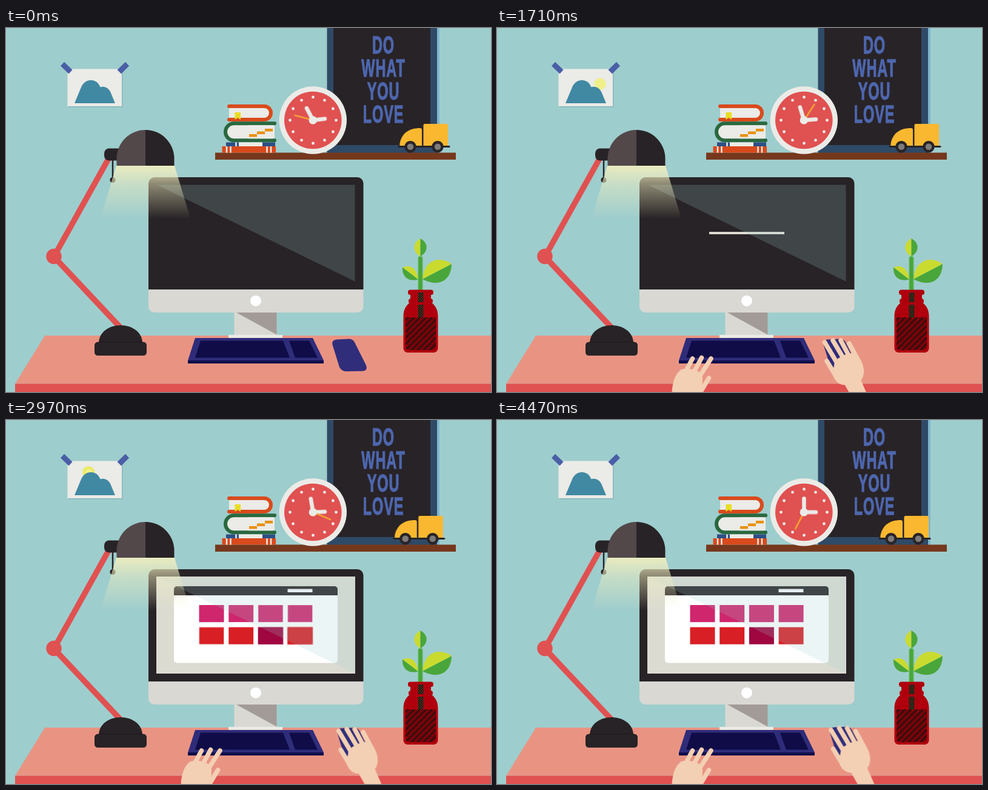
An HTML page for the animation above (4500 ms loop, 800x600 px).

```html
<!DOCTYPE html>
<html lang="en">
<head>
<meta charset="utf-8">
<title>Desk</title>
<style>
html, body { margin: 0; width: 100%; height: 100%; overflow: hidden; background: #9ecdcd; }
svg { display: block; width: 800px; height: 600px; }

.loop, .loop * { animation: 4500ms linear infinite both; }
.sign {
  font: bold 41px "Liberation Sans", Arial, sans-serif;
  text-anchor: middle; letter-spacing: 1.5px;
  fill: #4d66ae; stroke: #4d66ae; stroke-width: 1.3;
}
.dark { fill: #282326; }
.paper { fill: #ebebe7; }
.coral { fill: #e05151; }
.skin { fill: #f3cfb3; stroke: #f3cfb3; stroke-width: 7.5; stroke-linecap: round; stroke-linejoin: round; }
.skin .palm { stroke-width: 1; }

.hand-s, .hand-m, .hand-h { transform-origin: 506.5px 152px; stroke-linecap: round; }
.loop .hand-s { animation-name: seconds; }
.loop .hand-m { animation-name: minutes; }
.loop .hand-h { animation-name: hours; }
@keyframes seconds { from { transform: rotate(285deg); } to { transform: rotate(569.6deg); } }
@keyframes minutes { from { transform: rotate(-28deg); } to { transform: rotate(0deg); } }
@keyframes hours { from { transform: rotate(83deg); } to { transform: rotate(90deg); } }

.loop .truck { animation-name: drive; animation-timing-function: ease-in-out; }
@keyframes drive {
  0%, 37.78%, 76.22% { transform: translateX(0); }
  17.78%, 55.56%, 94%, 100% { transform: translateX(-17px); }
}

.loop .sun { transform-origin: 151px 101px; animation-name: arc; }
.loop .disc { animation-name: glow; }
.loop .ring { animation-name: ring; }
@keyframes arc {
  0%, 1.47% { transform: rotate(-100deg); }
  46.67% { transform: rotate(104deg); }
  46.68%, 54.4% { transform: rotate(-97deg); }
  97.8%, 100% { transform: rotate(97deg); }
}
@keyframes glow {
  0%, 2.6%, 45.5%, 55.6%, 97%, 100% { opacity: 0; }
  9.2%, 38%, 62%, 90% { opacity: 1; }
}
@keyframes ring {
  0%, 9.2%, 38%, 62%, 90%, 100% { opacity: 0; }
  17.5%, 29.9%, 70%, 82% { opacity: 1; }
}

.loop .rise { animation-name: rise; }
@keyframes rise {
  0%, 4.4% { transform: translateY(95px); animation-timing-function: ease-out; }
  15.2%, 100% { transform: none; }
}
.loop .nudge { animation-name: nudge; }
@keyframes nudge {
  0%, 60% { transform: none; animation-timing-function: ease-in-out; }
  69%, 100% { transform: translate(10.5px, -7px); }
}

.loop .lit { transform-origin: 412px 338px; animation-name: power; }
@keyframes power {
  0%, 36% { transform: scale(0, .022); }
  38% { transform: scale(.372, .022); }
  40.5% { transform: scale(1, .022); animation-timing-function: ease-in-out; }
  43.5%, 100% { transform: none; }
}
.loop .window { animation-name: slide; }
@keyframes slide {
  0%, 43.78% { transform: translateY(144px); animation-timing-function: cubic-bezier(.37, 0, .63, 1); }
  58.44%, 100% { transform: none; }
}
.loop .tile {
  transform-box: fill-box; transform-origin: center;
  animation-name: pop; animation-timing-function: ease-in-out;
  animation-delay: calc(var(--i) * 40ms);
}
@keyframes pop {
  0%, 48.89% { transform: scale(0); animation-timing-function: linear; }
  50.44% { transform: scale(1); animation-timing-function: ease-out; }
  52.22% { transform: scale(1.095); }
  55.78% { transform: scale(.953); }
  59.33% { transform: scale(1.026); }
  62.89% { transform: scale(.986); }
  66.44%, 100% { transform: none; }
}
</style>
</head>
<body>
<svg viewBox="0 0 800 600" xmlns="http://www.w3.org/2000/svg">
  <defs>
    <linearGradient id="beam" gradientUnits="userSpaceOnUse" x1="0" y1="227" x2="0" y2="315">
      <stop offset="0" stop-color="#f0edbf" stop-opacity=".92"/>
      <stop offset=".35" stop-color="#f0edbf" stop-opacity=".5"/>
      <stop offset="1" stop-color="#f0edbf" stop-opacity="0"/>
    </linearGradient>
    <pattern id="stripes" width="7" height="7" patternUnits="userSpaceOnUse" patternTransform="rotate(45)">
      <rect width="7" height="7" fill="#7c0008"/>
      <rect width="2.6" height="7" fill="#2b100f"/>
    </pattern>
    <pattern id="specks" width="4" height="4" patternUnits="userSpaceOnUse">
      <rect width="4" height="4" fill="#1e1512"/>
      <path d="M0 0h1.5v1.5H0zM2 2h1.5v1.5H2z" fill="#62502a"/>
    </pattern>
    <clipPath id="screen"><rect x="248.5" y="258.5" width="327" height="159.5"/></clipPath>
  </defs>

  <rect width="800" height="600" fill="#9ecdcd"/>

  <!-- picture on the wall -->
  <rect x="103" y="69" width="89.5" height="61.5" fill="#87b5bb"/>
  <rect class="paper" x="101.5" y="67.5" width="89.5" height="61.5"/>
  <g class="loop"><g class="sun">
    <circle class="disc" cx="151" cy="80" r="9.7" fill="#f0f08a"/>
    <circle class="ring" cx="151" cy="80" r="8" fill="none" stroke="#e7e52d" stroke-width="3.8"/>
  </g></g>
  <path d="M113 124L123 100C127 89 134 86 140 86C148 86 153 91 155.500 97.500C163 95 170 100 172.500 106L180 124z" fill="#4189a3"/>
  <g fill="#4a5fa6">
    <path d="M96 56l13.500 13l-6 6.500l-13.500-13z"/>
    <path d="M197 56l6 6.500l-13 13l-6.500-6.500z"/>
  </g>

  <!-- sign -->
  <rect x="711" width="4" height="205.500" fill="#7fb6cd"/>
  <rect x="529.500" width="181.500" height="206" fill="#2f4a67"/>
  <rect class="dark" x="540" width="160" height="193"/>
  <g class="sign" transform="translate(622.500 0) scale(.575 1)">
    <text y="42.500">DO</text>
    <text y="80.500">WHAT</text>
    <text y="118">YOU</text>
    <text y="156.500">LOVE</text>
  </g>

  <rect x="345" y="205.500" width="397" height="11.500" fill="#76381d"/>

  <!-- books -->
  <rect class="paper" x="370" y="130" width="60" height="21"/>
  <path d="M368 129H426a11 11 0 0 1 0 22H368" class="paper" stroke="#d94a1c" stroke-width="6" stroke-linecap="round"/>
  <path d="M377.500 139h9.500v12l-4.700-3l-4.800 3z" fill="#e8de22"/>
  <path d="M443 157.300H376a14 14 0 0 0 0 28H443" class="paper" stroke="#2a683f" stroke-width="6" stroke-linecap="round"/>
  <rect class="paper" x="400" y="160.300" width="40" height="22"/>
  <path d="M401 175h13v4.500h-13zM414 170.500h13v4.500h-13zM427 166h13v4.500h-13z" fill="#e8910f"/>
  <path class="paper" d="M383 188.500h40v7h-40z"/>
  <path d="M363 188.500h21v7h-21zM423 188.500h21v7h-21z" fill="#2d4f86"/>
  <rect x="356.500" y="195" width="88.500" height="10.500" fill="#d94a1c"/>
  <path d="M364 195v10.500M370.500 195v10.500M430.500 195v10.500M437 195v10.500M379.500 188.500v6.500" stroke="#ebebe7" stroke-width="2.500"/>

  <!-- clock -->
  <circle class="paper" cx="506.300" cy="152" r="55.700"/>
  <circle class="coral" cx="506.300" cy="152" r="47.300"/>
  <circle cx="506.500" cy="152" r="38" fill="none" stroke="#ebebe7" stroke-width="4.800" stroke-linecap="round" pathLength="12" stroke-dasharray="0 1"/>
  <g class="loop">
    <path class="hand-m" d="M506.500 152V129.500" stroke="#ebebe7" stroke-width="6.500"/>
    <path class="hand-h" d="M506.500 152V132.500" stroke="#ebebe7" stroke-width="6.500"/>
    <path class="hand-s" d="M506.500 152V121" stroke="#f6ae2d" stroke-width="2.300"/>
  </g>
  <circle class="paper" cx="506.300" cy="152" r="6.700"/>

  <!-- truck -->
  <g class="loop"><g class="truck">
    <rect x="688.500" y="158" width="40.500" height="37" rx="2.500" fill="#f9b82f"/>
    <path d="M649.500 195V190C653 173 665 165 683 165Q686 165 686 168V195z" fill="#f9b82f"/>
    <path d="M648 195.500H731" stroke="#282326" stroke-width="3" stroke-linecap="round"/>
    <g class="dark"><circle cx="667" cy="195.700" r="9.700"/><circle cx="712" cy="195.700" r="9.700"/></g>
    <g fill="#7d7c7a"><circle cx="667" cy="195.700" r="5.300"/><circle cx="712" cy="195.700" r="5.300"/></g>
  </g></g>

  <!-- desk -->
  <path d="M64 507H800V586.500H15z" fill="#e99483"/>
  <rect class="coral" x="15" y="586.500" width="785" height="13.500"/>

  <!-- monitor -->
  <rect x="376.500" y="468" width="70" height="38" fill="#d9d8d3"/>
  <path d="M379 468.500H446.500V505.500z" fill="#a29b97"/>
  <rect class="paper" x="367" y="505.800" width="89" height="5"/>
  <rect x="235" y="400" width="354.500" height="69" rx="10" fill="#d9d8d3"/>
  <path class="dark" d="M235 431V256a10 10 0 0 1 10-10H579.500a10 10 0 0 1 10 10V431z"/>
  <circle cx="412" cy="449.700" r="9" fill="#fff"/>
  <g clip-path="url(#screen)">
    <g class="loop">
      <rect class="lit" x="248" y="258" width="328" height="160" fill="#dbdbd2"/>
      <g class="window">
        <rect x="277" y="274" width="270" height="126.500" rx="5" fill="#fff"/>
        <path class="dark" d="M277 289V279a5 5 0 0 1 5-5H542a5 5 0 0 1 5 5V289z"/>
        <rect x="464.500" y="278.500" width="41" height="5.500" fill="#f5f5f8"/>
        <g id="tiles"></g>
      </g>
    </g>
    <path d="M248 258H576V418z" fill="#9ecdcd" opacity=".2"/>
  </g>

  <!-- lamp -->
  <path d="M171 212L79 377L190 495" fill="none" stroke="#e05151" stroke-width="9.500"/>
  <circle class="coral" cx="79" cy="376.500" r="12.700"/>
  <rect class="dark" x="162" y="198.500" width="34" height="20" rx="8"/>
  <path d="M176 216V248" stroke="#282326" stroke-width="2.500"/>
  <circle class="dark" cx="176" cy="250.500" r="4.600"/>
  <path d="M182 227H278L318 360H142z" fill="url(#beam)"/>
  <path d="M182.500 227V215.500A47.500 47.500 0 0 1 230.500 168V227z" fill="#524849"/>
  <path class="dark" d="M230 168A47.500 47.500 0 0 1 277.500 215.500V227H230z"/>
  <path class="dark" d="M153 518C154 501 170 490 189 490S224 501 225 518z"/>
  <rect class="dark" x="146" y="517.500" width="86" height="22.500" rx="5.500"/>
  <path d="M153 517.500H225" stroke="#1b1719" stroke-width="1"/>

  <!-- plant -->
  <path d="M683.500 347C670 354 670 369 683.500 376.500z" fill="#cadb30"/>
  <path d="M683.500 347C697 354 697 369 683.500 376.500z" fill="#49a63a"/>
  <path d="M654 394.500C667 389 678 396 680 414.500z" fill="#cadb30"/>
  <path d="M654 394.500C653 410 664 419 680 414.500z" fill="#49a63a"/>
  <path d="M687 414C689 386 711 373 735 389z" fill="#cadb30"/>
  <path d="M687 414C711 427 734 419 735 389z" fill="#49a63a"/>
  <path d="M683.500 380V434" stroke="#5cb552" stroke-width="8" stroke-linecap="round"/>
  <path d="M683.500 380V434" stroke="#49a63a" stroke-width="5" stroke-linecap="round"/>
  <g fill="#b0000e">
    <rect x="663" y="431.500" width="42" height="8.500" rx="4"/>
    <rect x="667" y="438" width="34" height="20"/>
    <rect x="664" y="446" width="40" height="8.500" rx="4"/>
    <path d="M667 452C660 457 655.500 464 655.500 475V528a7 7 0 0 0 7 7H705.500a7 7 0 0 0 7-7V475C712.500 464 708 457 701 452z"/>
  </g>
  <path d="M679.500 436h9v16h-9zM679.500 456h9v21h-9z" fill="url(#specks)"/>
  <path d="M659 477H709V526a5 5 0 0 1-5 5H664a5 5 0 0 1-5-5z" fill="url(#stripes)"/>

  <!-- keyboard -->
  <path d="M312 511H506L524 548H300z" fill="#2f2c7a"/>
  <rect x="300" y="548" width="224" height="5" fill="#100d4a"/>
  <path d="M321 515.500H457L468 543.500H312zM467 515.500H500L514 543.500H477z" fill="#0f0c47"/>

  <!-- mouse and hands -->
  <g class="loop">
    <g class="nudge">
      <path d="M545 513.500L566 512.500Q572 512.500 575 518L594 556Q597 564.500 589 565.500L560 566Q553 565 550 559L538.500 522Q537 514.500 545 513.500z" fill="#302d7b"/>
      <g class="rise skin">
        <path d="M540.500 518L562 554M554 515L573 547M567 515L583 545M581 520L596 548M544 549L561 577" fill="none"/>
        <path class="palm" d="M558 549C568 540 580 535 592 537C600 546 605 556 604.500 568C604 574 602 578 600 581L617 620H592L574 588C563 588 556 580 554 570z"/>
      </g>
    </g>
    <g class="rise skin">
      <path d="M322.500 545L308 572M337.500 543.500L321 574M353 545L333 576M349.500 577L335 601" fill="none"/>
      <path class="palm" d="M303 564C312 560 326 562 338 570C339 582 338 590 337 600L334 630H284L289 600C290 584 294 571 303 564z"/>
    </g>
  </g>
</svg>
<script>
const pink = '#d0266d', red = '#d81f25', wine = '#a00640';
const colors = [pink, pink, pink, pink, red, red, wine, red];
document.getElementById('tiles').innerHTML = colors.map((fill, i) => {
  const x = 318.5 + (i % 4) * 48.7, y = i < 4 ? 305 : 341.5;
  return `<rect class="tile" style="--i:${i}" x="${x}" y="${y}" width="41" height="28.2" fill="${fill}"/>`;
}).join('');
</script>
</body>
</html>
```
